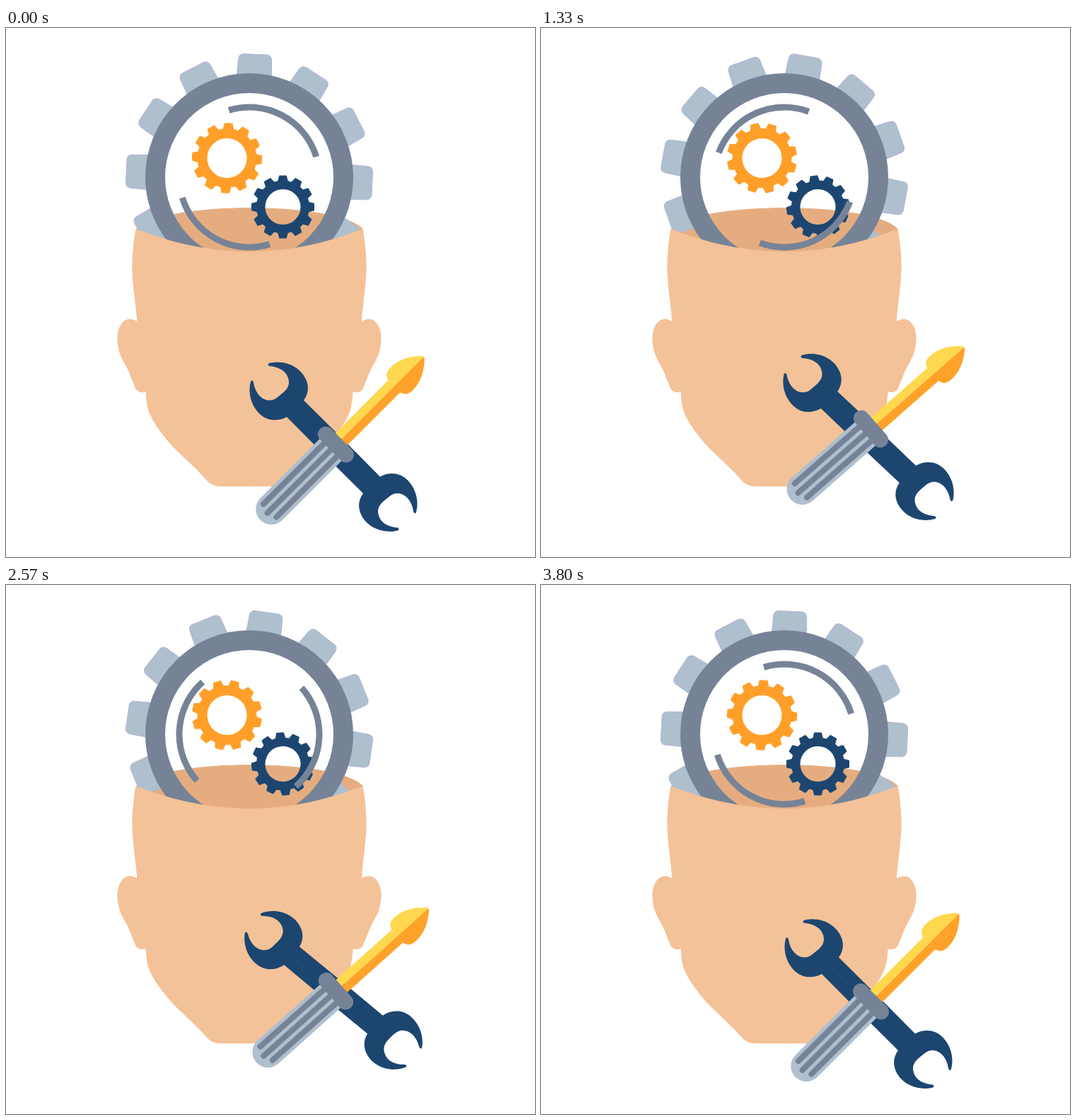
An HTML page for the animation above (3.83 s loop, 748 by 748 pixels).

```html
<!DOCTYPE html>
<html lang="en">
<head>
<meta charset="utf-8">
<title>Mind at work</title>
<style>
  html, body { margin: 0; width: 100%; height: 100%; overflow: hidden; background: #fff; }
  svg { display: block; width: 100vw; height: 100vh; }
</style>
</head>
<body>
<svg viewBox="0 0 748 748">
  <defs>
    <path id="halfHead" d="M345 317 Q264 317 184 285 Q180 305 179 335
      C179 365 184 385 186 416 C170 406 159 418 158 438 C158 450 160 460 167 472
      C174 482 178 496 184 510 Q190 517 198 513 Q199 528 201 537
      C205 553 220 573 235 590 C250 606 270 622 284 639 Q291 647 302 647.500 H345"/>
    <path id="halfWrench" d="M475 580 L421 526.5 C428 517 428 507 425 499
      C418 480 395 468 372 474 Q369 475.500 372 478 C386 479 396 485 399 495
      C403 508 394 514 384 522 C371 533 353 523 350 501 Q348 496 346 500
      C342 515 346 532 357 544 C368 556 384 557 397 550 L451 604.500 Z"/>
    <path id="halfBlade" d="M0 0 V-12 H116 L120 -19 Q123 -22 130 -22.500
      C148 -23 162 -14 173 -4 Q176 -1 175 0 Z"/>
  </defs>

  <path fill="#e5ad7f" stroke="#e5ad7f" d="M184 285 C220 244.500 469 244.500 505 285 Q344 349 184 285 Z"/>
  <g id="bigGear" fill="#aebfce" stroke="#b4b6d8"></g>
  <circle cx="344" cy="211" r="133" fill="none" stroke="#768397" stroke-width="28"/>
  <g id="orangeGear" fill="#ff9f29" stroke="#ff9f29"></g>
  <g id="navyGear" fill="#1c4670" stroke="#1c4670"></g>
  <g id="arcs" fill="none" stroke="#768397" stroke-width="9"></g>

  <g fill="#f4c298" stroke="#f4c298" stroke-width="1.4">
    <use href="#halfHead"/>
    <use href="#halfHead" transform="translate(688) scale(-1 1)"/>
  </g>

  <g id="wrench" fill="#1c4670">
    <use href="#halfWrench"/>
    <use href="#halfWrench" transform="rotate(180 463 592.200)"/>
    <path d="M409 540 L433 564" stroke="#32557c" stroke-width=".8"/>
  </g>

  <g id="screwdriver">
    <use href="#halfBlade" fill="#ffd84f"/>
    <use href="#halfBlade" fill="#ffa22a" transform="scale(1 -1)"/>
    <path fill="#aebfce" d="M0 -22 H-129 A22 22 0 0 0 -129 22 H0 Z"/>
    <path d="M-132 -13 H0 M-137 0 H0 M-132 13 H0" stroke="#768397" stroke-width="8" stroke-linecap="round"/>
    <rect x="-11" y="-31.500" width="22" height="63" rx="11" fill="#768397"/>
  </g>
</svg>
<script>
const LOOP = 3830, FPS = 30, TURN = 113, SWING = 56;
const $ = id => document.getElementById(id);
const cosDeg = a => Math.cos(a * Math.PI / 180);

const teeth = (d, attrs = '') => Array.from({ length: 12 },
  (_, i) => `<path ${attrs} d="${d}" transform="rotate(${i * 30})"/>`).join('');
const smallGear = (hole, body, tip, half) =>
  `<circle r="${(hole + body) / 2}" fill="none" stroke-width="${body - hole}"/>` +
  teeth(`M${-half - 1} ${2 - body} L${1 - half} ${1 - tip} Q${1 - half} ${-tip} ${2 - half} ${-tip}
    H${half - 2} Q${half - 1} ${-tip} ${half - 1} ${1 - tip} L${half + 1} ${2 - body} Z`, 'stroke="none"');

$('bigGear').innerHTML = teeth('M-25 -135 L-23.500 -167 Q-23 -173 -17 -174 H17 Q23 -173 23.500 -167 L25 -135 Z');
$('orangeGear').innerHTML = smallGear(28, 42, 49.5, 7);
$('navyGear').innerHTML = smallGear(25, 37.5, 44.5, 6.5);

const arcX = 99 * Math.SQRT1_2;
const arc = `M${-arcX} ${-arcX} A99 99 0 0 1 ${arcX} ${-arcX}`;
$('arcs').innerHTML = `<path d="${arc}"/><path d="${arc}" transform="rotate(180)"/>`;

const place = (id, x, y, angle) =>
  $(id).setAttribute('transform', `translate(${x} ${y}) rotate(${angle})`);

// Cosine swing, zero at the start of the loop; shift is a phase lead in degrees.
const swing = (phase, shift, size) => size * (cosDeg(shift) - cosDeg(phase + shift));

// Rest for the first third of each half cycle, then ease to the other end.
function lift(phase, size) {
  const half = phase % 360 / 180;
  const part = Math.max(0, (half % 1 - 1 / 3) * 1.5);
  const eased = (1 - cosDeg(180 * part)) / 2;
  return size * (half < 1 ? eased : 1 - eased);
}

function draw(ms) {
  const step = Math.floor((ms % LOOP + 5) * FPS / 1000);
  const turn = Math.min(step, TURN) / TURN * 360;
  place('bigGear', 344, 211, 2.8 + turn);
  place('arcs', 344, 211, 28 + turn);
  place('orangeGear', 312.5, 184, 2.6 + 2 * turn);
  place('navyGear', 391.5, 253, -turn);

  const wave = Math.min(step, 2 * SWING) / SWING * 360;
  $('wrench').setAttribute('transform',
    `translate(0 ${-swing(wave, 0, 11.25)}) rotate(${-swing(wave, 32, 3)} 463 592.2)`);
  place('screwdriver', 466.5, 589 - lift(2 * turn, 23), -45 + swing(2 * turn, -20, 2.45));
}

function tick() {
  draw(performance.now());
  requestAnimationFrame(tick);
}
tick();
</script>
</body>
</html>
```
